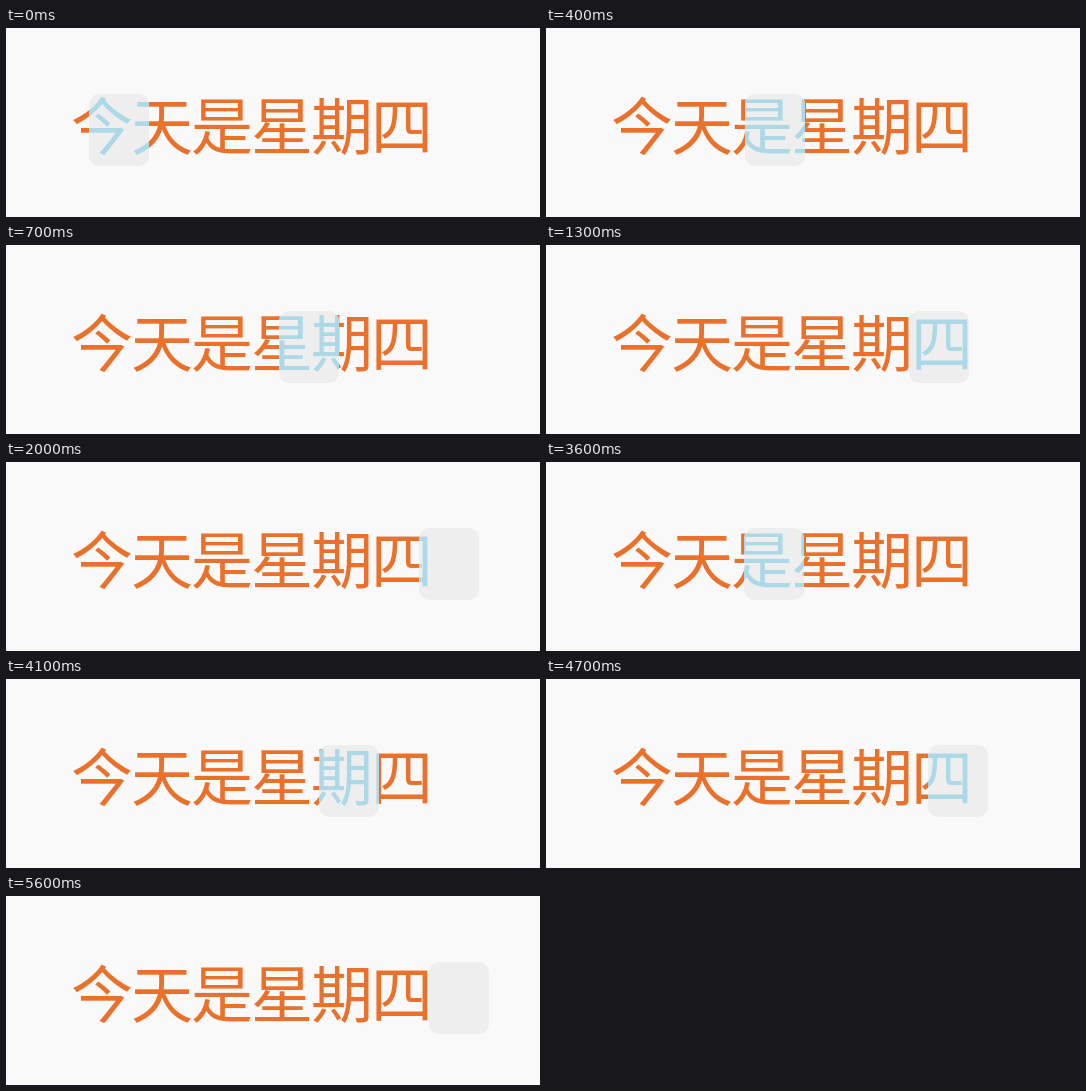
An HTML page with a canvas for the animation above (5.8 s loop, 534 by 189 pixels).

```html
<!DOCTYPE html>
<html lang="zh-CN">
<head>
<meta charset="utf-8">
<style>
html, body { margin: 0; width: 100%; height: 100%; overflow: hidden; background: #f9f9f9; }
canvas { display: block; }
</style>
</head>
<body>
<canvas id="stage" width="534" height="189"></canvas>
<script>
const ctx = document.getElementById('stage').getContext('2d');
const LOOP = 5800, STEP = 100;
const START = 4, TRAVEL = 420;
const BOX = { y: 66, w: 60, h: 72, r: 10 };
const TEXT = '今天是星期四';

// Each sweep lists [time, box left]; in between, the box follows one ease curve.
const SWEEPS = [
  [[0, 83], [600, 249], [700, 273], [1200, 353], [1300, 363], [1800, 403], [2400, 423]],
  [[2800, 12], [3300, 108], [3600, 198], [3900, 273], [4500, 368], [4700, 382], [5100, 408], [5600, 423]]
];

const bezier = (u, a, b) => 3 * a * u * (1 - u) ** 2 + 3 * b * u * u * (1 - u) + u ** 3;
const easeTime = u => bezier(u, 0.25, 0.25);
const easeValue = u => bezier(u, 0.1, 1);

function solve(curve, target) {
  let low = 0, high = 1;
  for (let i = 0; i < 30; i++) {
    const mid = (low + high) / 2;
    if (curve(mid) < target) low = mid; else high = mid;
  }
  return (low + high) / 2;
}

const phaseAt = x => easeTime(solve(easeValue, (x - START) / TRAVEL));
const leftAt = phase => START + TRAVEL * easeValue(solve(easeTime, phase));

function boxLeft(time) {
  const sweep = SWEEPS[time < 2800 ? 0 : 1];
  const next = sweep.findIndex(key => key[0] > time);
  if (next < 0) return sweep[sweep.length - 1][1];
  const [t0, x0] = sweep[next - 1], [t1, x1] = sweep[next];
  const p0 = phaseAt(x0), p1 = phaseAt(x1);
  return leftAt(p0 + (p1 - p0) * (time - t0) / (t1 - t0));
}

function drawText(color) {
  ctx.font = '62px "Noto Sans CJK SC", "Noto Sans CJK", sans-serif';
  ctx.textAlign = 'center';
  ctx.fillStyle = color;
  [...TEXT].forEach((char, i) => ctx.fillText(char, 96 + 60 * i, 122));
}

function draw(time) {
  ctx.fillStyle = '#f9f9f9';
  ctx.fillRect(0, 0, 534, 189);
  drawText('#ea712b');
  ctx.save();
  ctx.beginPath();
  ctx.roundRect(Math.round(boxLeft(time)), BOX.y, BOX.w, BOX.h, BOX.r);
  ctx.fillStyle = '#eeeeee';
  ctx.fill();
  ctx.clip();
  drawText('#add8e6');
  ctx.restore();
}

const begin = performance.now();
function frame() {
  const elapsed = (performance.now() - begin) % LOOP;
  draw(Math.floor(elapsed / STEP) * STEP);
  requestAnimationFrame(frame);
}
frame();
</script>
</body>
</html>
```
